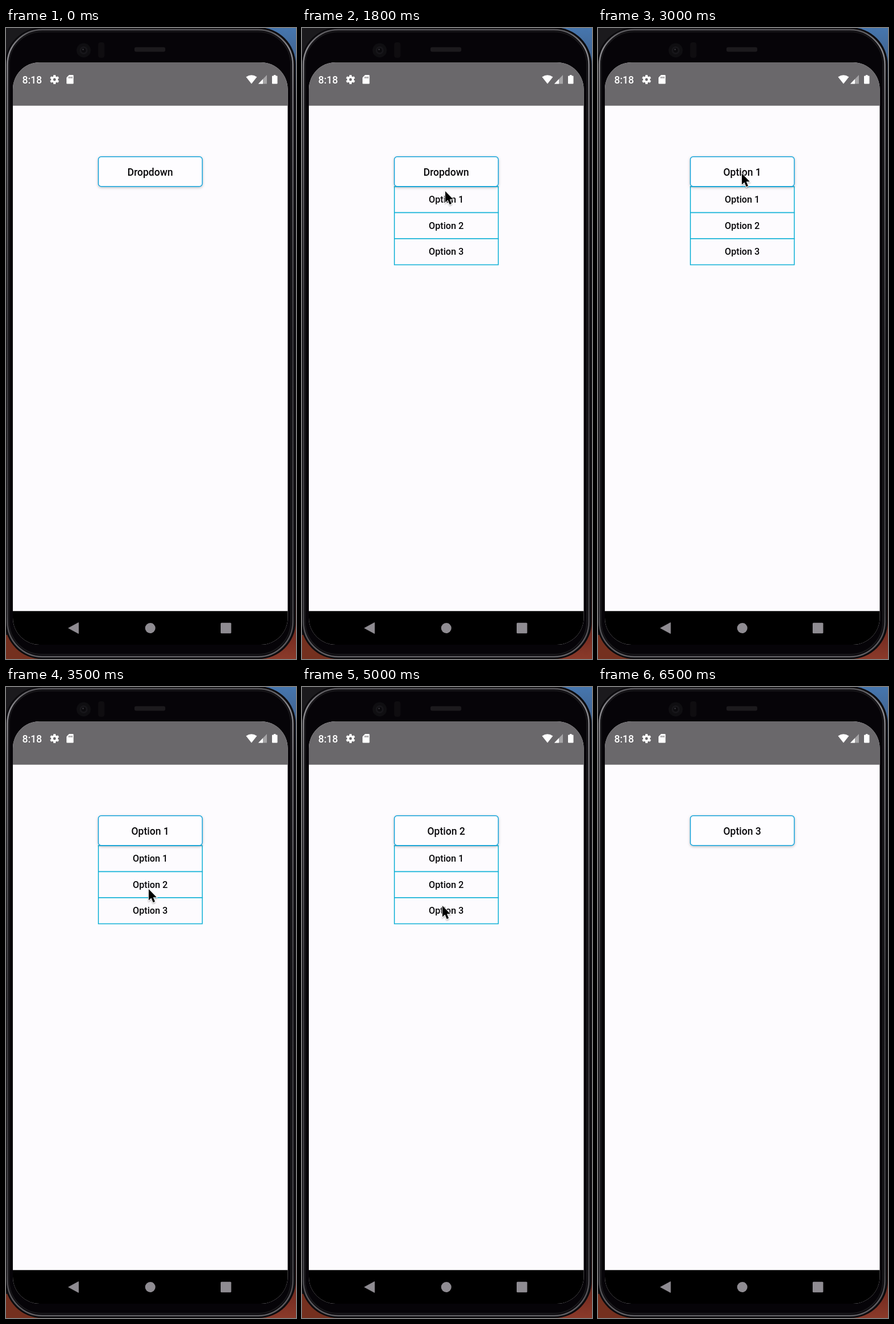
Animation, 508 px wide and 1102 px high, one loop 6600 ms. Source, as an HTML page:

```html
<!DOCTYPE html>
<html lang="en">
<head>
<meta charset="utf-8">
<title>Dropdown</title>
<style>
html, body { margin: 0; width: 100%; height: 100%; overflow: hidden; background: #1a191c; }
svg { display: block; width: 508px; height: 1102px; }
text { font: 500 16.2px Roboto, sans-serif; fill: #08070a; text-anchor: middle; }
#label { font-size: 17.5px; }
#clock { font-size: 17.5px; fill: #fff; text-anchor: start; }
</style>
</head>
<body>
<svg viewBox="0 0 508 1102">
  <defs>
    <linearGradient id="wall" x2="0" y2="1">
      <stop offset="0" stop-color="#4676ae"/>
      <stop offset=".05" stop-color="#41638f"/>
      <stop offset=".12" stop-color="#1d2029"/>
      <stop offset=".85" stop-color="#1c1517"/>
      <stop offset=".97" stop-color="#7a2f23"/>
      <stop offset="1" stop-color="#8a3a2a"/>
    </linearGradient>
    <linearGradient id="rim" x2="0" y2="1">
      <stop offset="0" stop-color="#58575b"/>
      <stop offset=".03" stop-color="#8b8a8e"/>
      <stop offset=".1" stop-color="#737276"/>
      <stop offset=".36" stop-color="#4a494d"/>
      <stop offset=".5" stop-color="#39383c"/>
      <stop offset=".93" stop-color="#454448"/>
      <stop offset="1" stop-color="#605f63"/>
    </linearGradient>
    <clipPath id="screen"><rect x="12" y="60" width="481.5" height="1017" rx="47"/></clipPath>
    <filter id="lift" x="-10%" y="-20%" width="120%" height="150%">
      <feDropShadow dx="0" dy="1.5" stdDeviation="2" flood-color="#000" flood-opacity=".25"/>
    </filter>
    <filter id="soft" x="-40%" y="-30%" width="200%" height="180%">
      <feDropShadow dx="0" dy="1.5" stdDeviation="1.2" flood-color="#000" flood-opacity=".35"/>
    </filter>
  </defs>

  <!-- wallpaper behind the phone -->
  <rect width="508" height="1102" fill="#1b1a1d"/>
  <rect x="250" width="258" height="1102" fill="url(#wall)"/>
  <rect y="1060" width="250" height="42" fill="#74301f"/>

  <!-- body -->
  <rect x="-2" y="-1" width="509.5" height="1103" rx="65" fill="#0c0b0e"/>
  <rect x="2.500" y="3" width="500" height="1095" rx="61" fill="#060408" stroke="url(#rim)" stroke-width="2.6"/>
  <rect x="5.500" y="6.500" width="493.500" height="1087.500" rx="57" fill="none" stroke="#19181b" stroke-width="2"/>
  <circle cx="136" cy="39" r="12.5" fill="#0f0e11"/>
  <circle cx="136" cy="39" r="7" fill="#17161a"/>
  <circle cx="136" cy="39" r="4" fill="#0b0a0d"/>
  <circle cx="135" cy="37.500" r="1.300" fill="#3a393e"/>
  <rect x="161.500" y="25" width="11" height="27" rx="4" fill="#0f0d10"/>
  <rect x="225" y="33.500" width="54" height="8" rx="3" fill="#1c1a1d"/>

  <!-- screen -->
  <g clip-path="url(#screen)">
    <rect x="12" y="60" width="482" height="1017" fill="#fdfbfe"/>
    <rect x="12" y="60" width="482" height="75.700" fill="#6a686b"/>
    <rect x="12" y="1018.300" width="482" height="60"/>
  </g>

  <!-- status bar -->
  <text id="clock" x="28.500" y="96.700">8:18</text>
  <g fill="#fff">
    <g transform="translate(85 90)">
      <circle r="4.200" fill="none" stroke="#fff" stroke-width="3.6"/>
      <g id="teeth"></g>
    </g>
    <path d="M110.500 82h6.500q1.300 0 1.300 1.300v13q0 1.300-1.300 1.300h-9.700q-1.300 0-1.300-1.300V86.500z"/>
    <path d="M110.500 85v3M113 85v3M115.500 85v3" stroke="#6a686b" stroke-width="1.200"/>
    <path d="M430 97.500 420.500 85.500Q430 79 439.500 85.500z"/>
    <path d="M457 82v15.500h-15z" opacity=".4"/>
    <path d="M450 89.200v8.300h-8z"/>
    <path d="M469 82h3.500v1.600h2q1 0 1 1v12q0 1-1 1h-7.500q-1 0-1-1v-12q0-1 1-1h2z"/>
  </g>

  <!-- navigation bar -->
  <g fill="#8f8c92">
    <path d="M109.500 1048 127 1038.500v19z" stroke="#8f8c92" stroke-linejoin="round"/>
    <circle cx="252.700" cy="1048" r="9"/>
    <rect x="376" y="1038.700" width="18.500" height="18.500" rx="1.500"/>
  </g>

  <!-- dropdown -->
  <g id="list" stroke="#1ab4d8" stroke-width="1.600"></g>
  <rect x="161.800" y="224.800" width="182" height="52" rx="5" fill="#fefdff" stroke="#18a4da" stroke-width="1.500" filter="url(#lift)"/>
  <text id="label" x="252.600" y="258"></text>
  <g id="names"></g>

  <path id="cursor" d="M0 0V19.500L4.500 15.500 7.700 23.200 11 21.800 7.800 14.300H13.800z" stroke="#fff" stroke-width="1.800" paint-order="stroke" filter="url(#soft)"/>
</svg>
<script>
const LOOP = 6600, STEP = 100;
const $ = id => document.getElementById(id);

for (let a = 0; a < 360; a += 60)
  $('teeth').innerHTML += `<rect x="-2" y="-8" width="4" height="4" rx=".6" transform="rotate(${a})"/>`;

for (let i = 0; i < 3; i++) {
  const y = 277 + i * 45.5;
  $('list').innerHTML += `<rect x="161.800" y="${y}" width="182" height="45.500" fill="#fdfbfe"/>`;
  $('names').innerHTML += `<text x="252.700" y="${y + 28.200}">Option ${i + 1}</text>`;
}

// time, x, y of the pointer tip
const path = [
  [600, 515, 400], [1000, 254, 248], [1400, 254, 248], [1800, 251, 285],
  [2100, 250, 299], [2400, 250, 299], [2800, 252, 254], [3100, 252, 254],
  [3500, 250, 353], [3900, 250, 353], [4300, 251, 255], [4600, 251, 255],
  [5000, 246, 382], [5300, 246, 387], [5700, 246, 387], [6200, -25, 440]
];
const opened = [[1400, 2200], [3000, 3900], [4500, 5500]];

function pointer(t) {
  const i = path.findIndex(k => k[0] > t);
  if (i < 1) return null;
  const [t0, x0, y0] = path[i - 1], [t1, x1, y1] = path[i];
  const p = (t - t0) / (t1 - t0), e = p * p * (3 - 2 * p);
  return [x0 + (x1 - x0) * e, y0 + (y1 - y0) * e];
}

function show(id, on) { $(id).style.display = on ? '' : 'none'; }

function draw(now) {
  const t = Math.floor(now % LOOP / STEP) * STEP;
  const open = opened.some(([a, b]) => t >= a && t < b);
  const chosen = opened.filter(o => t >= o[1]).length;
  show('list', open);
  show('names', open);
  $('label').textContent = chosen ? 'Option ' + chosen : 'Dropdown';
  const tip = pointer(t);
  show('cursor', tip);
  if (tip) $('cursor').setAttribute('transform', `translate(${tip})`);
}

let start;
function tick(now) {
  start ??= now;
  draw(now - start);
  requestAnimationFrame(tick);
}
draw(0);
requestAnimationFrame(tick);
</script>
</body>
</html>
```
